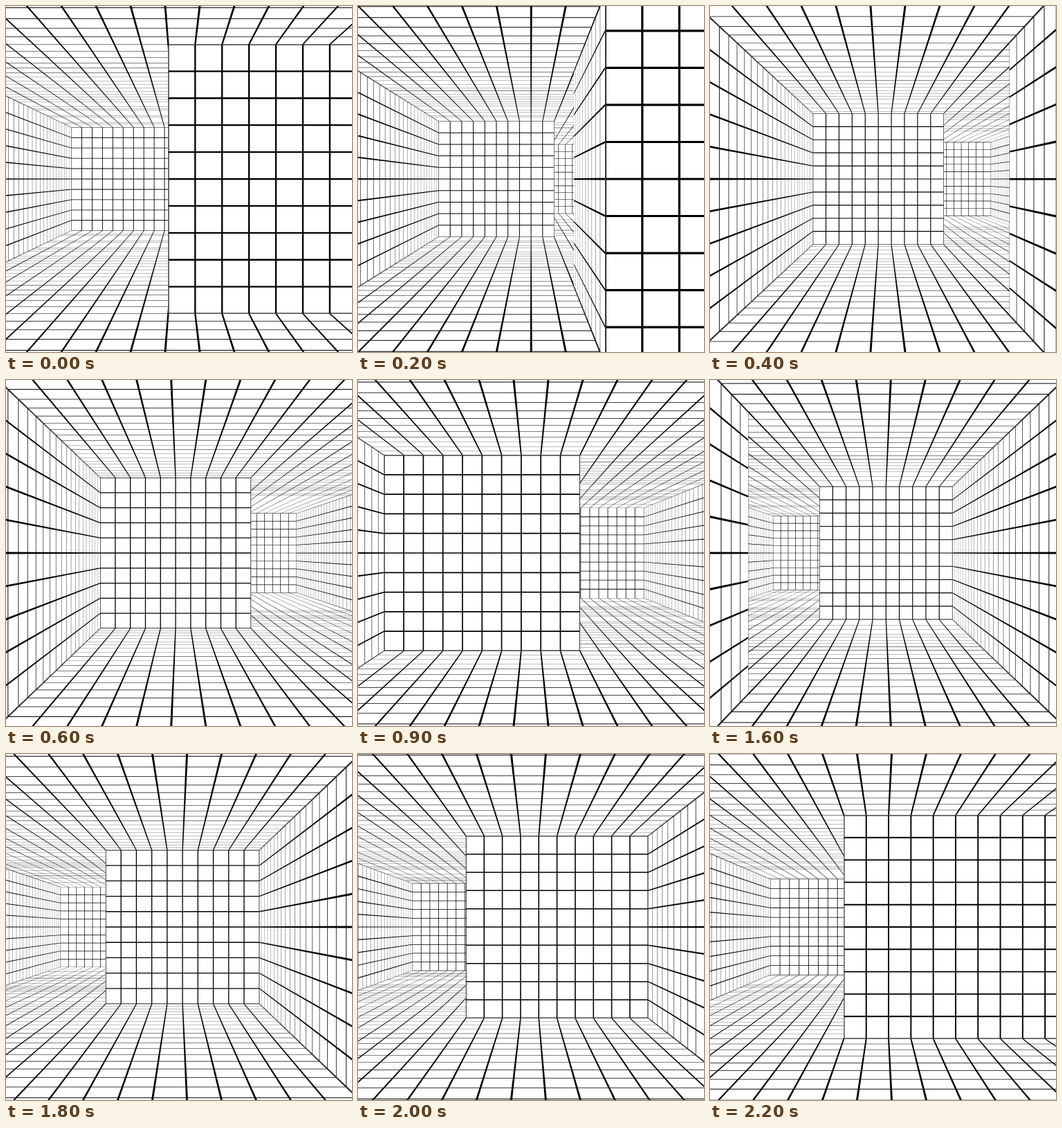
An HTML page with a canvas for the animation above (2300 ms loop, 500 by 500 pixels).

```html
<!DOCTYPE html>
<html lang="en">
<head>
<meta charset="utf-8">
<title>Grid corridor</title>
<style>
html, body { margin: 0; width: 100%; height: 100%; overflow: hidden; background: #fff; }
canvas { display: block; width: 500px; height: 500px; }
</style>
</head>
<body>
<canvas id="stage" width="500" height="500"></canvas>
<script>
const ctx = document.getElementById('stage').getContext('2d');
const LOOP = 2300, STEP = 100, PERIOD = 2350;
const FOCAL = 728, NEAR = 0.5, DEPTH = 160;
const GAP = 30, BLOCK = 10, LINE = 0.03; // LINE is half a grid line, in cells

// Sideways sway of the camera over one period: [time, x].
const sway = [
  [0, 0.4], [125, -0.96], [400, -4.64], [600, -4.775], [900, -2.5],
  [1175, -0.4], [1300, 0.96], [1575, 4.64], [1800, 4.77], [2200, 1.75]
];
const cam = { x: 0, z: 0 };

function knot(i) {
  const n = sway.length, turn = Math.floor(i / n);
  const [t, x] = sway[i - turn * n];
  return [t + turn * PERIOD, x];
}

function slope(i) {
  const [[t0, x0], [t1, x1], [t2, x2]] = [knot(i - 1), knot(i), knot(i + 1)];
  const a = t1 - t0, b = t2 - t1;
  return (b * (x1 - x0) / a + a * (x2 - x1) / b) / (a + b);
}

function swayAt(t) {
  let i = 0;
  while (knot(i + 1)[0] <= t) i++;
  const [t0, x0] = knot(i), [t1, x1] = knot(i + 1);
  const h = t1 - t0, s = (t - t0) / h, r = 1 - s;
  return x0 * r * r * (1 + 2 * s) + x1 * s * s * (3 - 2 * s)
    + h * s * r * (r * slope(i) - s * slope(i + 1));
}

function project([x, y, z]) {
  const scale = FOCAL / Math.max(z - cam.z, NEAR);
  return [250 + (x - cam.x) * scale, 250 + y * scale];
}

function quad(place, u0, v0, u1, v1) {
  [[u0, v0], [u1, v0], [u1, v1], [u0, v1]].forEach(([u, v], i) => {
    const p = project(place(u, v));
    if (i) ctx.lineTo(...p); else ctx.moveTo(...p);
  });
  ctx.closePath();
}

// A white face of cols by rows cells; place(u, v) gives a point in space.
function face(cols, rows, place) {
  ctx.beginPath();
  quad(place, 0, 0, cols, rows);
  ctx.fillStyle = '#fff';
  ctx.fill();
  ctx.beginPath();
  for (let u = 0; u <= cols; u++)
    quad(place, Math.max(u - LINE, 0), 0, Math.min(u + LINE, cols), rows);
  for (let v = 0; v <= rows; v++)
    quad(place, 0, Math.max(v - LINE, 0), cols, Math.min(v + LINE, rows));
  ctx.fillStyle = '#000';
  ctx.fill();
}

function drawBlock(j) {
  const z = j * GAP, left = j % 2 ? -10 : 0;
  face(BLOCK, 10, (u, v) => [0, v - 5, z + u]);
  if (z > cam.z + NEAR) face(10, 10, (u, v) => [left + u, v - 5, z]);
}

function draw(t) {
  cam.x = swayAt(t);
  cam.z = -18.71 + t * 2 * GAP / PERIOD;
  ctx.fillStyle = '#fff';
  ctx.fillRect(0, 0, 500, 500);
  const start = Math.floor(cam.z);
  for (const side of [-1, 1]) {
    face(20, DEPTH, (u, v) => [u - 10, side * 5, start + v]);
    face(DEPTH, 10, (u, v) => [side * 10, v - 5, start + u]);
  }
  const first = Math.ceil((cam.z - BLOCK) / GAP);
  for (let j = first + 5; j >= first; j--) drawBlock(j);
}

let shown = -1;
function tick() {
  const t = Math.floor(performance.now() % LOOP / STEP) * STEP;
  if (t !== shown) draw(shown = t);
  requestAnimationFrame(tick);
}
tick();
</script>
</body>
</html>
```
